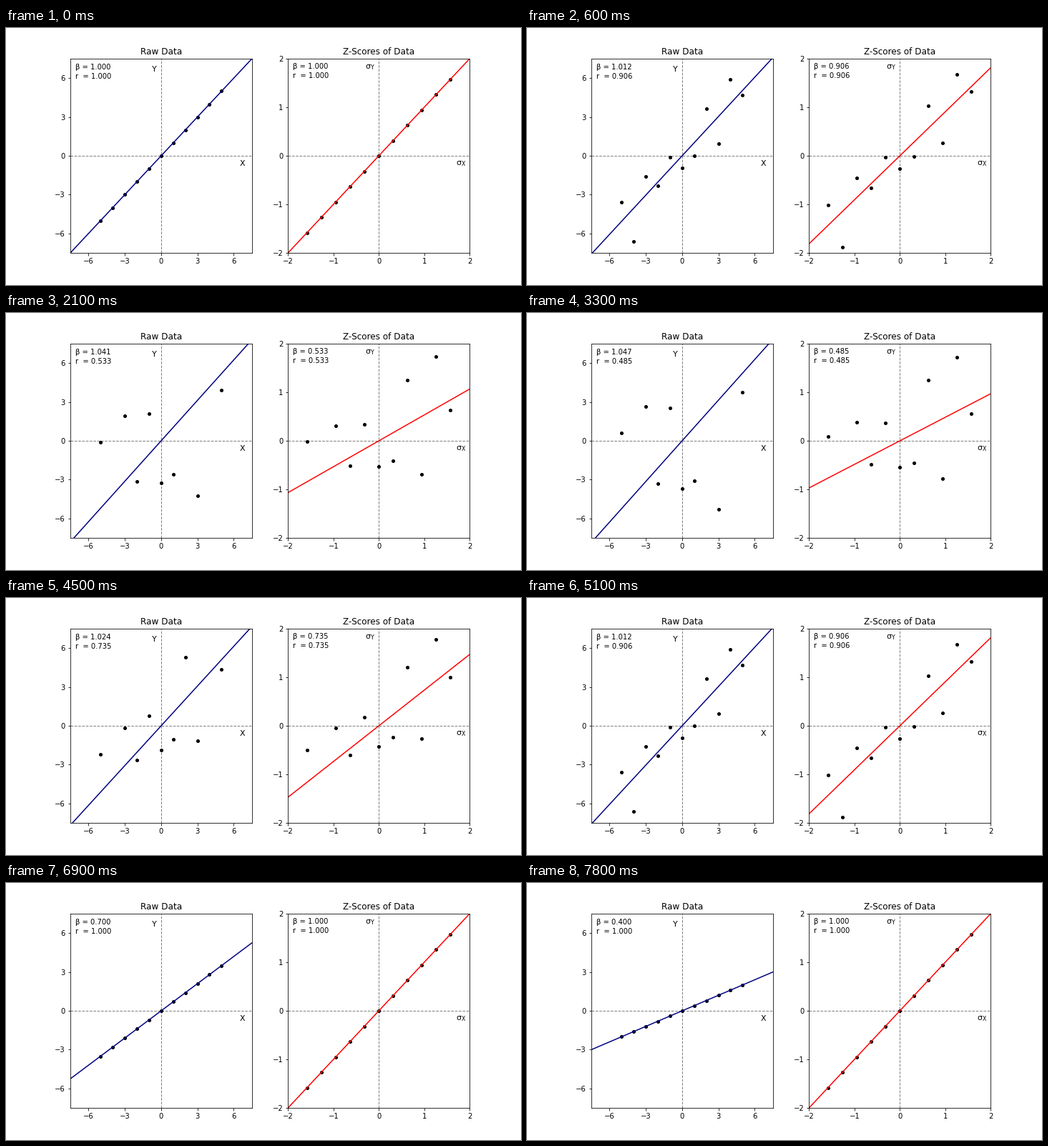
A matplotlib script that plays this animation: 720x360 px, repeating every 8 s.

```python
import numpy as np
import matplotlib.pyplot as plt
from matplotlib.animation import FuncAnimation

STEP = 100      # ms per frame
LOOP = 8000     # ms per loop

x = np.arange(-5, 6)
noise = np.array([0.702, -1.315, 0.707, -0.163, 0.443, -0.4645,
                  -0.511, 0.823, -1.037, 0.968, -0.152])


def state(t):
    """Noise level and slope at time t (ms)."""
    if t < 3000:
        return t // 300, 1.0
    if t < 6000:
        return 9 - (t - 3000) // 300, 1.0
    return 0, 1.0 - 0.1 * ((t - 6000) // 300)


def zscore(v):
    return (v - v.mean()) / v.std()


plt.rcParams["font.family"] = "DejaVu Sans"
fig, axes = plt.subplots(1, 2, figsize=(10, 5), dpi=72)
fig.subplots_adjust(left=0.125, right=0.9, bottom=0.125, top=0.88, wspace=0.2)


class Panel:
    def __init__(self, ax, title, limit, ticks, color, x_label, y_label, stats):
        ax.set_title(title, fontsize=12)
        ax.set(xlim=(-limit, limit), ylim=(-limit, limit),
               xticks=ticks, yticks=ticks)
        style = dict(color="gray", lw=1, ls="--", zorder=0)
        ax.axhline(0, **style)
        ax.axvline(0, **style)
        for px, py, label in (x_label, y_label):
            ax.text(px, py, label, fontsize=11)
        left, beta_y, r_y = stats
        self.beta = ax.text(left, beta_y, "", fontsize=10)
        self.r = ax.text(left, r_y, "", fontsize=10)
        self.dots = ax.scatter(x, x, s=16, c="black", linewidths=1, zorder=1)
        self.ends = np.array([-limit, limit])
        self.line, = ax.plot(self.ends, self.ends, color=color, lw=1.5, zorder=2)

    def update(self, u, v):
        slope = np.sum(u * v) / np.sum(u * u)
        self.dots.set_offsets(np.column_stack([u, v]))
        self.line.set_ydata(slope * self.ends)
        self.beta.set_text(f"β = {slope:.3f}")
        self.r.set_text(f"r  = {np.corrcoef(u, v)[0, 1]:.3f}")
        return self.dots, self.line, self.beta, self.r


raw = Panel(axes[0], "Raw Data", 7.5, [-6, -3, 0, 3, 6], "navy",
            (6.5, -0.77, "X"), (-0.75, 6.5, "Y"), (-7.1, 6.7, 5.97))
std = Panel(axes[1], "Z-Scores of Data", 2, [-2, -1, 0, 1, 2], "red",
            (1.7, -0.2, r"$\mathrm{σ_X}$"), (-0.3, 1.8, r"$\mathrm{σ_Y}$"),
            (-1.9, 1.8, 1.6))


def draw(i):
    level, slope = state(i * STEP)
    y = slope * x + level * noise
    return raw.update(x, y) + std.update(zscore(x), zscore(y))


anim = FuncAnimation(fig, draw, frames=LOOP // STEP, interval=STEP,
                     init_func=lambda: draw(0), repeat=True, repeat_delay=0)
plt.show()
```
